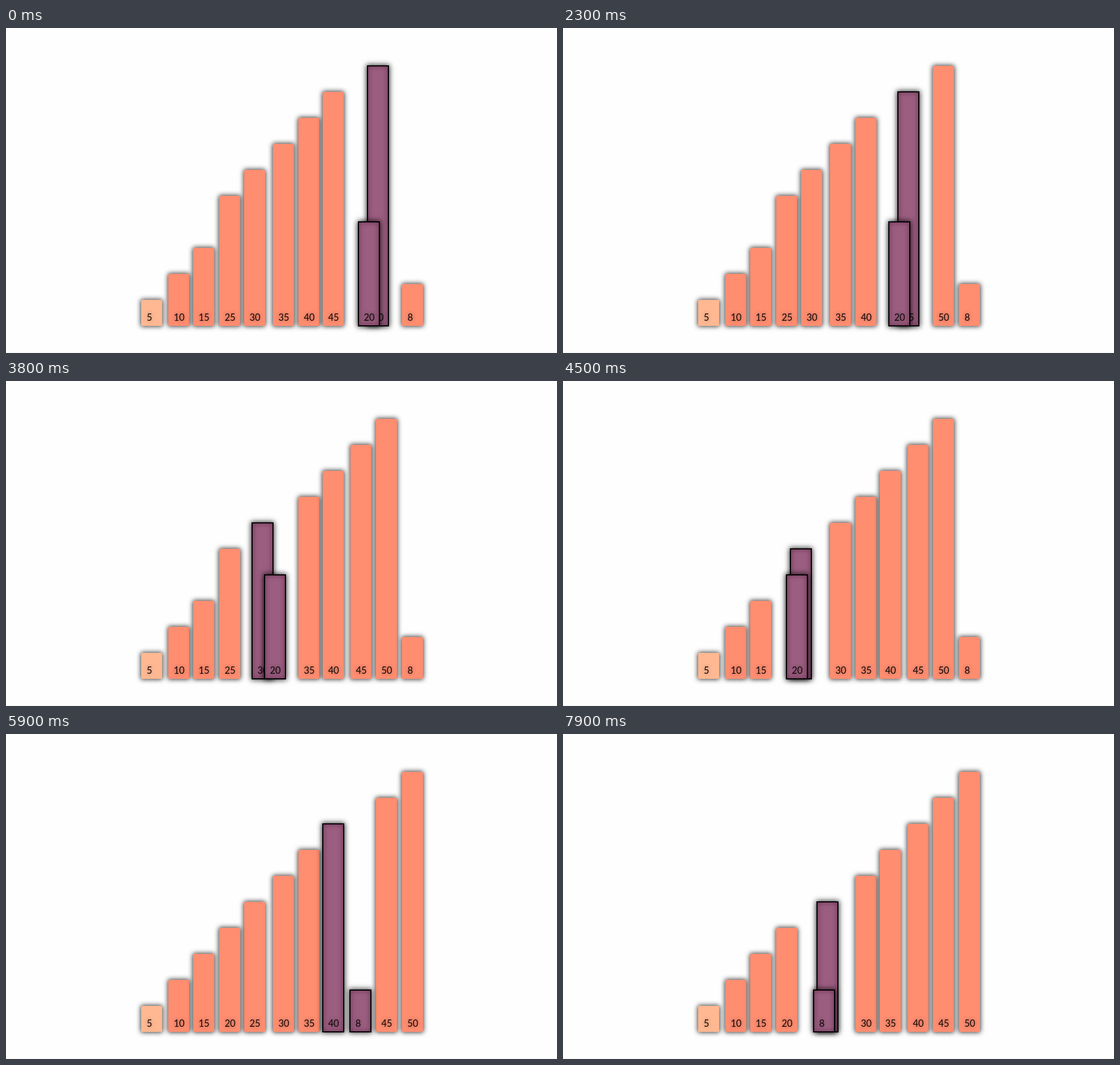
Animation, 974 px wide and 575 px high, one loop 8000 ms. Source, as an HTML page:

```html
<!DOCTYPE html>
<html lang="en">
<head>
<meta charset="utf-8">
<title>Insertion sort</title>
<style>
html, body { margin: 0; width: 100%; height: 100%; overflow: hidden; background: #fefefe; }
#stage { position: relative; width: 974px; height: 575px; overflow: hidden; }
#stage::after { content: ""; position: absolute; left: 0; top: 574px; width: 974px; height: 1px; background: #f1f1f1; }
.bar {
  position: absolute; bottom: 48px; width: 37px; border-radius: 3px 3px 2px 2px;
  background: #ff8d70; box-shadow: 0 0 9px 1px rgba(0, 0, 0, .78);
}
.bar.first { background: #ffb891; }
.bar.active {
  border-radius: 0; background: #9b5e80;
  box-shadow: 0 0 0 1px #000, inset 0 0 0 1px #000,
    inset 0 0 10px 1px rgba(70, 20, 50, .6), 0 0 9px 2px rgba(0, 0, 0, .8);
}
.bar span {
  position: absolute; left: .6px; bottom: 5.5px; width: 37px; text-align: center;
  font: 16.6px/20px Lato, sans-serif; color: #120909; text-shadow: 0 0 6px rgba(0, 0, 0, .4);
}
.bar span.digit { left: -4px; }
</style>
</head>
<body>
<div id="stage"></div>
<script>
const STEP = 100, LOOP = 8000, UNIT = 9.2;
const slots = [239, 287, 331, 377, 421, 472, 517, 560, 609, 654, 700];
const start = [5, 10, 15, 25, 30, 35, 40, 45, 50, 20, 8];
const stalls = [34, 57, 77];

const stage = document.getElementById("stage");
const bars = {};
for (const value of start) {
  const bar = document.createElement("div");
  const label = document.createElement("span");
  label.textContent = value;
  if (value < 10) label.className = "digit";
  bar.style.height = value * UNIT + "px";
  bar.append(label);
  stage.append(bar);
  bars[value] = bar;
}

// Swaps done: a long hold, then a steady rate that skips the stalled ticks
function swapsAt(tick) {
  const moving = tick - 17 - stalls.filter(at => at <= tick).length;
  return Math.max(.68, .54 + .1868 * moving);
}

// Position of the travelling bar before swap k: first 20 moves down, then 8
const keySlot = k => k < 6 ? 9 - k : 16 - k;

function place(value, x, active, z) {
  const bar = bars[value];
  bar.className = "bar" + (active ? " active" : value === 5 ? " first" : "");
  bar.style.left = Math.floor(x) + "px";
  bar.style.zIndex = z;
}

function draw(tick) {
  const phase = swapsAt(tick), k = Math.floor(phase), p = phase - k;
  const order = start.slice();
  for (let i = 0; i < k; i++) {
    const s = keySlot(i);
    [order[s - 1], order[s]] = [order[s], order[s - 1]];
  }
  order.forEach((value, i) => place(value, slots[i], false, 0));
  const s = keySlot(k), shift = (slots[s] - slots[s - 1]) * p;
  place(order[s - 1], slots[s - 1] + shift, true, 1);
  place(order[s], slots[s] - shift, true, 2);
}

const origin = performance.now();
function frame() {
  draw(Math.floor((performance.now() - origin) % LOOP / STEP));
  requestAnimationFrame(frame);
}
frame();
</script>
</body>
</html>
```
